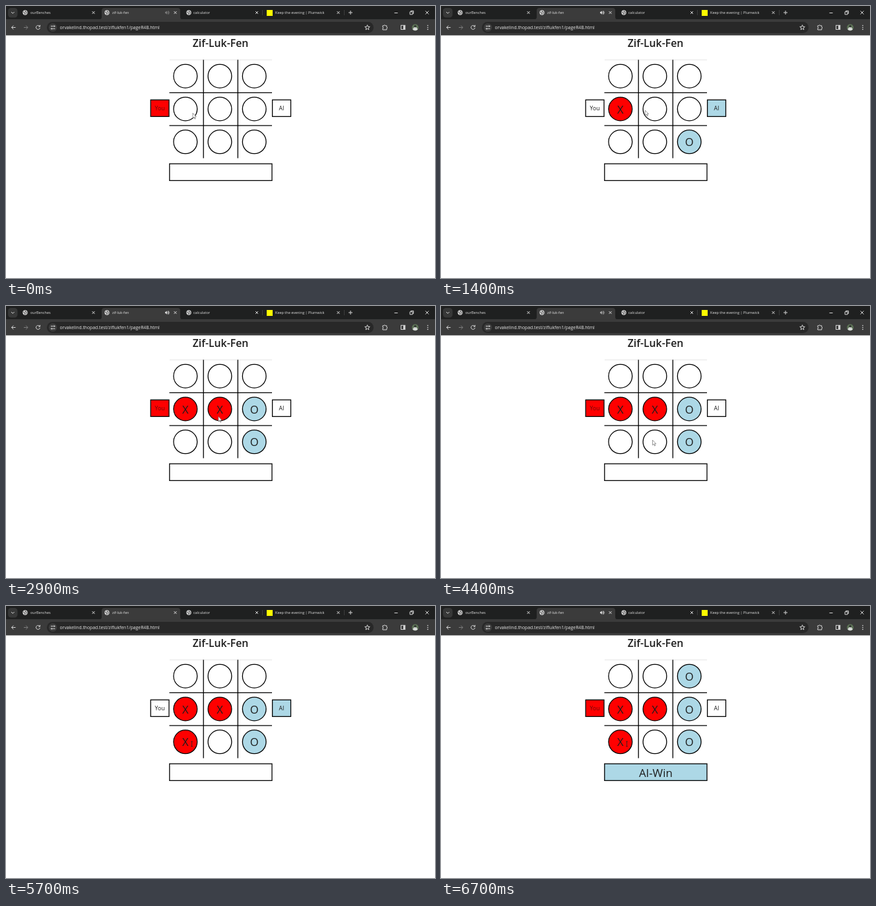
An HTML page for the animation above (8000 ms loop, 650 by 412 pixels).

```html
<!DOCTYPE html>
<html lang="en">
<head>
<meta charset="utf-8">
<title>zif-luk-fen</title>
<style>
  html, body { margin: 0; width: 100%; height: 100%; overflow: hidden; background: #fff; }
  svg { display: block; width: 100%; height: 100%; }
  text { font-family: "Open Sans", "Noto Sans", sans-serif; }
  .tab { font-size: 5.5px; fill: #dedede; }
  .icon { fill: none; stroke: #d4d4d4; stroke-width: 1; }
  .line { fill: none; stroke: #000; stroke-width: 1.3; }
  .mid { text-anchor: middle; fill: #1c1c1c; }
</style>
</head>
<body>
<svg id="stage" viewBox="0 0 650 412">
  <defs>
    <g id="globe">
      <circle r="3.7" fill="#d0d0d0"/>
      <path d="M-2.8 -1 L-.6 .2 L-.2 2.8 M.3 -2.8 L.6 -1 L2.8 -.6 M1 1.2 L2.4 1.6" fill="none" stroke="#4a4a4a" stroke-width="1"/>
    </g>
    <path id="close" class="icon" d="M-2 -2 L2 2 M2 -2 L-2 2"/>
  </defs>

  <rect width="650" height="412" fill="#fff"/>
  <rect width="650" height="21" fill="#1f2020"/>
  <rect y="20" width="650" height="24.5" fill="#3b3b3b"/>
  <path d="M141 20.5 Q145 20.5 145 16.5 V7 Q145 3 149 3 H260 Q264 3 264 7 V16.5 Q264 20.5 268 20.5 Z" fill="#3b3b3b"/>
  <rect x="3" y="3" width="14.5" height="14.5" rx="4.5" fill="#373838"/>
  <path class="icon" d="M8 9 L10.3 11.3 L12.6 9"/>
  <path d="M388.5 6 V14 M512.5 6 V14" stroke="#454646" stroke-width=".8"/>

  <use href="#globe" x="29" y="10"/>
  <use href="#globe" x="153" y="10"/>
  <use href="#globe" x="277" y="10"/>
  <rect x="395" y="6" width="9" height="9" fill="#fffc00"/>
  <text class="tab" x="37" y="12">ourBenches</text>
  <text class="tab" x="161" y="12">zif-luk-fen</text>
  <text class="tab" x="284" y="12">calculator</text>
  <text class="tab" x="408" y="12">Keep the evening | Plumwick</text>
  <use href="#close" x="132.5" y="10"/>
  <use href="#close" x="256.5" y="10"/>
  <use href="#close" x="380" y="10"/>
  <use href="#close" x="503.5" y="10"/>
  <path class="icon" d="M519 10 H525 M522 7 V13"/>
  <g id="speaker">
    <path d="M241 8.8 H242.4 L244.2 7.2 V12.9 L242.4 11.3 H241 Z" fill="#d4d4d4"/>
    <path class="icon" stroke-width=".7" d="M245.3 8.5 Q246.6 10 245.3 11.5 M246 7.3 Q248.6 10 246 12.8"/>
  </g>
  <path class="icon" d="M588.5 10.5 H593.5 M612 8.8 H616 V12.8 H612 Z M613.4 8.6 V7.4 H617.4 V11.4 H616.2 M635.5 7.5 L640.5 12.5 M640.5 7.5 L635.5 12.5"/>

  <rect x="62" y="24" width="495" height="17" rx="8.5" fill="#282828"/>
  <path class="icon" d="M14.5 32.5 H8.5 M11.3 29.6 L8.4 32.5 L11.3 35.4"/>
  <path class="icon" style="stroke:#7c7c7c" d="M27 32.5 H33 M30.2 29.6 L33.1 32.5 L30.2 35.4"/>
  <path class="icon" d="M51 30.7 A3 3 0 1 0 51.5 33 M51.6 28.8 V31.2 H49.2"/>
  <circle cx="71" cy="32.5" r="6.3" fill="#3d3d3d"/>
  <path class="icon" d="M68 30.6 H71 M73 30.6 H74.5 M67.8 34.4 H69.3 M71.3 34.4 H74.3"/>
  <circle class="icon" cx="72.8" cy="30.6" r=".9"/>
  <circle class="icon" cx="69.5" cy="34.4" r=".9"/>
  <text x="81.5" y="34.9" font-size="6.8" fill="#e4e4e4">orvakelind.thopad.test/ziflukfen1/pageR4B.html</text>
  <path id="star" class="icon" stroke-linejoin="round"/>
  <path class="icon" d="M570.8 29.8 H572.8 Q573.6 27.4 574.6 29.8 H576.8 V32 Q579.2 32.9 576.8 33.9 V36 H570.8 V34 Q572.8 33 570.8 32 Z"/>
  <rect class="icon" x="598.5" y="29.3" width="6.2" height="6.2"/>
  <rect x="601.9" y="29.3" width="2.8" height="6.2" fill="#d4d4d4"/>
  <circle cx="620" cy="32.5" r="5" fill="#5d7256"/>
  <path d="M616 35.3 A5 5 0 0 0 624 35.3 L621.5 32 H618.5 Z" fill="#d5d8d6"/>
  <circle cx="620" cy="30.8" r="1.7" fill="#2f3430"/>
  <g fill="#d4d4d4">
    <circle cx="639" cy="29.6" r=".8"/><circle cx="639" cy="32.5" r=".8"/><circle cx="639" cy="35.4" r=".8"/>
  </g>

  <text class="mid" x="325" y="62" font-size="15.8" font-weight="600">Zif-Luk-Fen</text>
  <path d="M248 81.7 H403" stroke="#dedede" stroke-width=".8"/>
  <path class="line" d="M299.2 81.5 V230.5 M351.3 81.5 V230.5 M247.5 131.3 H403 M247.5 181.2 H403"/>
  <g id="cells"></g>

  <rect id="youBox" class="line" x="219.2" y="142.2" width="27.8" height="25.2"/>
  <text id="youText" class="mid" x="233" y="158.4" font-size="8.6">You</text>
  <rect id="aiBox" class="line" x="403.6" y="142.2" width="27.9" height="25.2"/>
  <text class="mid" x="417.4" y="158.4" font-size="8.6">AI</text>
  <rect id="resultBox" class="line" x="247.8" y="239" width="155.2" height="25.4"/>
  <text id="resultText" class="mid" x="325.3" y="258.8" font-size="16.8">AI-Win</text>

  <g id="pointer">
    <path id="arrow" d="M0 0 V7.6 L1.8 6 L3 8.8 L4.2 8.3 L3 5.6 H5.3 Z" fill="#fff" stroke="#555" stroke-width=".6"/>
    <path id="beam" d="M-1.3 0 H1.3 M0 0 V7.5 M-1.3 7.5 H1.3" fill="none" stroke="#222" stroke-width=".8"/>
  </g>
</svg>
<script>
const LOOP = 8000, TICK = 100;
const RED = '#ff0000', BLUE = '#add8e6', WHITE = '#ffffff';
const $ = id => document.getElementById(id);

// [time, cell, mark]
const moves = [
  [600, 3, 'X'], [900, 8, 'O'],
  [1700, 4, 'X'], [2000, 5, 'O'],
  [5600, 6, 'X'], [6000, 2, 'O']
];
// spans in which the AI badge is lit
const aiTurns = [[600, 1600], [1700, 2800], [5600, 6700]];
const winTime = 6000, beamTime = 5600;
// [time, x, y]
const path = [
  [0, 283, 162.3], [1100, 283, 162.3], [1400, 309.3, 158], [2700, 309.3, 158],
  [2900, 321.8, 167.3], [3400, 326, 203], [4300, 326, 203], [5200, 277, 204],
  [5500, 277, 204], [5600, 281.6, 205.2]
];
// [time, opacity]
const sound = [[0, .4], [200, 0], [1200, 0], [1400, 1], [4300, 1], [4600, 0], [6200, 0], [6400, 1]];

function sample(keys, t) {
  const i = keys.findIndex(k => k[0] > t);
  if (i < 0) return keys[keys.length - 1].slice(1);
  const a = keys[i - 1], b = keys[i];
  const p = (t - a[0]) / (b[0] - a[0]);
  return a.slice(1).map((v, n) => v + (b[n + 1] - v) * p);
}

function add(parent, tag, attrs) {
  const el = document.createElementNS('http://www.w3.org/2000/svg', tag);
  for (const k in attrs) el.setAttribute(k, attrs[k]);
  return parent.appendChild(el);
}

const cells = Array.from({ length: 9 }, (_, i) => {
  const x = 271.8 + i % 3 * 52.2, y = 106.2 + Math.floor(i / 3) * 49.8;
  return {
    disc: add($('cells'), 'circle', { class: 'line', cx: x, cy: y, r: 17.9 }),
    mark: add($('cells'), 'text', { class: 'mid', x, y: y + 6.6, 'font-size': 16.6 })
  };
});

const starPoints = Array.from({ length: 10 }, (_, i) => {
  const r = i % 2 ? 1.7 : 4, a = (i / 5 - .5) * Math.PI;
  return `${547.5 + r * Math.cos(a)} ${32.7 + r * Math.sin(a)}`;
});
$('star').setAttribute('d', `M${starPoints.join('L')}Z`);

function draw(t) {
  cells.forEach(({ disc, mark }, i) => {
    const move = moves.find(m => m[1] === i && m[0] <= t);
    disc.style.fill = !move ? WHITE : move[2] === 'X' ? RED : BLUE;
    mark.textContent = move ? move[2] : '';
  });

  const ai = aiTurns.some(([from, to]) => t >= from && t < to);
  $('youBox').style.fill = ai ? WHITE : RED;
  $('youText').style.fill = ai ? '#1c1c1c' : '#6b0808';
  $('aiBox').style.fill = ai ? BLUE : WHITE;

  const won = t >= winTime;
  $('resultBox').style.fill = won ? BLUE : WHITE;
  $('resultText').style.display = won ? '' : 'none';

  $('speaker').style.opacity = sample(sound, t)[0];
  $('pointer').setAttribute('transform', `translate(${sample(path, t)})`);
  $('arrow').style.display = t < beamTime ? '' : 'none';
  $('beam').style.display = t < beamTime ? 'none' : '';
}

const start = performance.now();
function frame() {
  const t = (performance.now() - start) % LOOP;
  draw(Math.floor(t / TICK) * TICK);
  requestAnimationFrame(frame);
}
frame();
</script>
</body>
</html>
```
